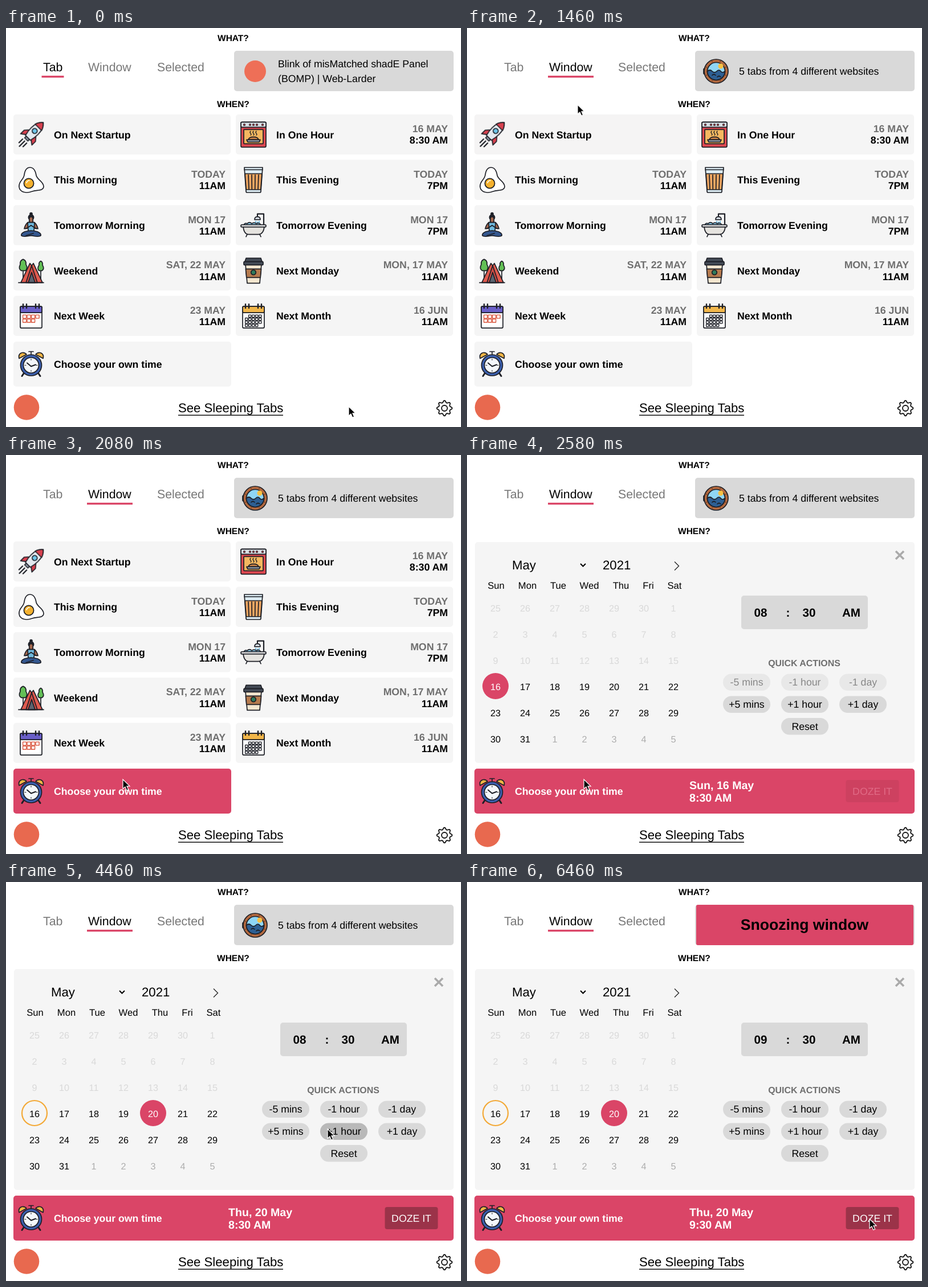
These frames come from a looping animation (798 by 701 pixels, 6.54 s). An HTML page:

```html
<!DOCTYPE html>
<html lang="en">
<head>
<meta charset="utf-8">
<title>Sleeping tabs</title>
<style>
  html, body { margin: 0; width: 100%; height: 100%; overflow: hidden; background: #fff; }
  svg { display: block; width: 798px; height: 701px; font-family: "Liberation Sans", Arial, sans-serif; }
  text { text-rendering: geometricPrecision; }
  .b { font-weight: bold; }
  .m { text-anchor: middle; }
  .e { text-anchor: end; }
  .icon { stroke: #1d1f26; stroke-width: 1.7; stroke-linejoin: round; stroke-linecap: round; }
  #pink { transform-box: fill-box; transform-origin: center; }
</style>
</head>
<body>
<svg id="stage" viewBox="0 0 798 701"></svg>
<script>
const LOOP = 6540;
const PINK = '#da4567';
const stage = document.getElementById('stage');

// Shape helpers
const text = (x, y, str, size = 17.7, cls = '', extra = '') =>
  `<text x="${x}" y="${y}" font-size="${size}" class="${cls}" ${extra}>${str}</text>`;
const box = (x, y, w, h, r, fill, extra = '') =>
  `<rect x="${x}" y="${y}" width="${w}" height="${h}" rx="${r}" fill="${fill}" ${extra}/>`;
const dot = (x, y, r, fill, extra = '') =>
  `<circle cx="${x}" cy="${y}" r="${r}" fill="${fill}" ${extra}/>`;
const path = (d, fill = 'none', extra = '') => `<path d="${d}" fill="${fill}" ${extra}/>`;
const group = (id, body, extra = '') => `<g id="${id}" ${extra}>${body}</g>`;
const range = n => [...Array(n).keys()];

// Icons, each centred on 0,0
const calendar = (top, cells) =>
  box(-19, -17, 38, 38, 2, '#fff') + box(-19, -17, 38, 11, 2, top) +
  [-14, -8, 8, 14].map(x => path(`M${x} -21V-14`, 'none', 'stroke-width="2.4"')).join('') + cells;
const cells = (cols, rows, w, color, keep) => range(cols * rows).filter(keep).map(i =>
  box(-15 + (i % cols) * (30 / cols) + .6, -2 + Math.floor(i / cols) * (w + 1.2), w, w, .5, '#fff',
    `stroke="${color}" stroke-width="1.4"`)).join('');

const icons = {
  rocket: `<g transform="rotate(45)">` +
    path('M-7 -5L-14 3V12L-6 6ZM7 -5L14 3V12L6 6Z', '#d8414f') +
    path('M0 -30C10 -21 10 -7 6 8H-6C-10 -7 -10 -21 0 -30Z', '#e4e9ef') +
    path('M0 -30Q6 -25 8 -18H-8Q-6 -25 0 -30Z', '#d8414f') +
    dot(0, -9, 4.4, '#6fc5e8') + path('M-4 8H4V12H-4Z', '#8d97a5') +
    path('M0 16V29M-5 16V25M5 16V25', 'none', 'stroke-width="2.2"') + '</g>',
  oven: box(-22, -22, 44, 44, 2, '#de4850') + box(-22, -22, 44, 9, 2, '#d9dee3') +
    [-16, -6, 0, 6, 16].map(x => dot(x, -17.3, 1.5, '#de4850', 'stroke-width="1.2"')).join('') +
    box(-17, -9, 34, 25, 1, '#f5b860') +
    path('M-5 -6q-2 2 0 4t0 3M0 -6q-2 2 0 4t0 3M5 -6q-2 2 0 4t0 3', 'none', 'stroke-width="1.3"') +
    path('M-9 9Q-8 4 0 4T9 9Z', '#c98145') + path('M-12 9H12L10 13H-10Z', '#9aa4ae'),
  egg: path('M-2 -22C6 -22 8 -14 9 -8C11 0 21 2 22 11C22 20 10 17 2 20C-8 24 -20 22 -21 12C-22 2 -13 0 -12 -9C-11 -16 -9 -22 -2 -22Z', '#fff') +
    dot(-4, 6, 8.6, '#f5b12e') + path('M-8 5Q-7 1 -3 1', 'none', 'stroke="#fff"'),
  glass: path('M-16 -22H16L13 20Q13 22 11 22H-11Q-13 22 -13 20Z', '#dcebf2') +
    path('M-14.8 -11H14.8L12.8 17H-12.8Z', '#efa662') +
    path('M-9 -9L-8 16M-3 -9L-2.7 16M3 -9L2.7 16M9 -9L8 16M-16 -18H16'),
  yoga: dot(0, -20, 2, '#23252d') + dot(0, -14, 4.6, '#23252d') + box(-3.2, -15, 6.4, 11, 3.2, '#a5694f') +
    path('M-6 -5Q-11 0 -12 6L0 4L12 6Q11 0 6 -5Z', '#a5694f') + path('M-6 -5H6L5 11H-5Z', '#70b9dd') +
    path('M-9 6L0 0L9 6', 'none') +
    path('M-11 11Q0 8 11 11Q18 14 17 18Q14 21 0 18Q-14 21 -17 18Q-18 14 -11 11Z', '#34578f') +
    path('M-9 18L4 14'),
  bath: path('M18 0V-20H7V-16', 'none', 'stroke-width="2.2"') + path('M2 -10Q2 -15 7 -15T12 -10Z', '#dde5ec') +
    path('M4 -7V-5M7 -6V-4M10 -7V-5', 'none', 'stroke="#5bb4e2"') +
    path('M-17 0Q-16 -5 -11 -3Q-7 -7 -3 -3Q1 -6 5 -3Q11 -6 13 0Z', '#8fd0ef') +
    path('M-18 2H19Q18 15 9 16H-9Q-17 15 -18 2Z', '#e5e3df') + box(-22, -1, 44, 4, 2, '#f4f4f4') +
    path('M-11 16L-13 20M11 16L13 20'),
  tent: path('M-14 20V-8M17 16V-6') + path('M-14 -20Q-8 -18 -9 -11Q-5 -4 -10 0H-17Q-23 -3 -19 -11Q-20 -18 -14 -20Z', '#62bf55') +
    path('M17 -17Q21 -15 20 -10Q24 -3 19 0H14Q10 -4 14 -10Q13 -15 17 -17Z', '#62bf55') +
    path('M-2 -13L-18 21H20L4 -13L1 -9Z', '#e05a4e') + path('M1 -9L-9 21H11Z', '#d14d45') +
    path('M1 3L-5 21H7Z', '#5b6470') + path('M-22 21H22'),
  coffee: path('M-14 -11H14L11 22H-11Z', '#f4e6cf') + path('M-13.6 -3H13.6L12.2 12H-12.2Z', '#b67b4e') +
    dot(0, 3, 4.3, '#2f7d5b') + box(-17, -16, 34, 6, 1.5, '#454c57') + path('M-13 -22H13L15 -16H-15Z', '#454c57'),
  week: calendar('#6a5fc8', cells(4, 2, 6, '#d9573f', i => i < 7)),
  month: calendar('#f1b64a', cells(5, 4, 4.2, '#23252d', i => i && i < 19)),
  clock: path('M-12 15L-16 21M12 15L16 21', 'none', 'stroke-width="3"') +
    path('M-21 -10Q-23 -18 -16 -20Q-11 -21 -8 -17ZM21 -10Q23 -18 16 -20Q11 -21 8 -17Z', '#f2b544') +
    path('M0 -17V-21M-4 -22H4') + dot(0, 2, 18.5, '#3b5fae') + dot(0, 2, 13.5, '#f3f7fb') +
    path('M-7 -2L0 4L8 1', 'none', 'stroke-width="2"') +
    path('M0 -9V-7M0 11V13M-11 2H-9M9 2H11', 'none', 'stroke-width="1"'),
  porthole: box(-22, -5, 6, 10, 2, '#b87746') + dot(0, 0, 21, '#b3693f') + dot(0, 0, 15.5, '#8fd6f5') +
    dot(8, -9, 4.5, '#f7c144', 'stroke="none"') +
    path('M-15.5 0Q-11 -4 -7 0T1 0T8 0T15.5 0A15.5 15.5 0 0 1 -15.5 0Z', '#2d5f93') +
    path('M-7 7q3 -3 6 0M2 10q3 -3 6 0') +
    range(8).map(i => dot(18.3 * Math.cos(i * .785 + .39), 18.3 * Math.sin(i * .785 + .39), 1, '#6d3d25', 'stroke="none"')).join('')
};
const icon = (name, x, y) => `<g class="icon" fill="none" transform="translate(${x} ${y})">${icons[name]}</g>`;

// Snooze cards
const cards = [
  ['rocket', 'On Next Startup', '', ''], ['oven', 'In One Hour', '16 MAY', '8:30 AM'],
  ['egg', 'This Morning', 'TODAY', '11AM'], ['glass', 'This Evening', 'TODAY', '7PM'],
  ['yoga', 'Tomorrow Morning', 'MON 17', '11AM'], ['bath', 'Tomorrow Evening', 'MON 17', '7PM'],
  ['tent', 'Weekend', 'SAT, 22 MAY', '11AM'], ['coffee', 'Next Monday', 'MON, 17 MAY', '11AM'],
  ['week', 'Next Week', '23 MAY', '11AM'], ['month', 'Next Month', '16 JUN', '11AM']
];
const mix = k => `rgb(${[[246, 218], [165, 69], [87, 103]].map(([a, b]) => Math.round(a + (b - a) * k))})`;
function card([name, label, day, hour], i) {
  const row = i >> 1, x = i % 2 ? 403 : 13, y = 151.8 + row * 79.7;
  const face = (bg, ink, soft) => box(x, y, 381, 70.4, 5, bg) +
    text(x + 71, y + 41.8, label, 17.7, 'b', `fill="${ink}"`) +
    text(x + 372, y + 31.4, day, 17.7, 'b e', `fill="${soft}"`) +
    text(x + 372, y + 51.6, hour, 17.7, 'b e', `fill="${ink}"`);
  return face('#f5f5f5', '#000', '#6f6f6f') +
    (i % 2 ? '' : group('hot' + row, face(mix(row / 6), '#fff', '#fff'), 'opacity="0"')) +
    icon(name, x + 31, y + 35.5);
}

// Date and time picker
const names = { Sun: 51, Mon: 106, Tue: 160, Wed: 214.5, Thu: 270, Fri: 318, Sat: 364 };
function day(i) {
  const n = i < 6 ? 25 + i : (i - 6) % 31 + 1;
  const ink = i < 21 ? '#d9d9d9' : i > 36 ? '#adadad' : '#000';
  return text(50 + i % 7 * 52, 274.7 + Math.floor(i / 7) * 46, n, 16.2, 'm', `fill="${ink}"`);
}
const picked = (id, x, n) => group(id, dot(x, 406, 23, PINK) + text(x, 412.7, n, 16.2, 'm', 'fill="#fff"'));
const pill = (x, y, label, id = '') =>
  box(x, y, 83, 29.5, 14.7, '#d9d9d9', id && `id="${id}"`) + text(x + 41.5, y + 20.8, label, 17.7, 'm');
const picker =
  box(14, 153, 771, 388, 5, '#f5f5f5') +
  text(79, 201, 'May', 22.2) + text(238, 201, 2021, 22.2) +
  path('M199 191L203.5 195.5L208 191', 'none', 'stroke="#000" stroke-width="2"') +
  path('M364 187.5L371.5 195L364 202.5', 'none', 'stroke="#222" stroke-width="1.3"') +
  path('M752 169L766 183M766 169L752 183', 'none', 'stroke="#aaa" stroke-width="3.6"') +
  Object.entries(names).map(([n, x]) => text(x, 234.5, n, 16.6, 'm')).join('') +
  dot(258, 406, 23, '#e6e6e6', 'id="dayHover"') +
  range(42).map(day).join('') +
  dot(50, 406, 22, 'none', 'id="today" stroke="#f3a937" stroke-width="2.2"') +
  picked('pick16', 50, 16) + picked('pick20', 258, 20) +
  box(481, 247, 222, 59, 5, '#d9d9d9') +
  text(503.5, 284, '08', 20.6, 'b', 'id="h8"') + text(503.5, 284, '09', 20.6, 'b', 'id="h9"') +
  text(559.5, 284, ':', 20.6, 'b') + text(588.5, 284, 30, 20.6, 'b') + text(658, 284, 'AM', 20.6, 'b') +
  text(591.5, 371, 'QUICK ACTIONS', 15.9, 'b m', 'fill="#6f6f6f"') +
  group('minus', pill(449, 384.5, '-5 mins') + pill(551, 384.5, '-1 hour') + pill(653, 384.5, '-1 day')) +
  pill(449, 423.5, '+5 mins') + pill(551, 423.5, '+1 hour', 'plusHour') + pill(653, 423.5, '+1 day') +
  pill(551, 462, 'Reset');

const when = (id, date, hour) => group(id,
  text(390, 586.5, date, 19.6, 'b') + text(390, 608.7, hour, 19.6, 'b'), 'fill="#fff"');
const chooser =
  box(13, 551, 382, 79, 5, '#f5f5f5') + text(84, 597, 'Choose your own time', 17.7, 'b') +
  group('hot5', box(13, 551, 382, 79, 5, PINK, 'id="bar"') +
    text(84, 597, 'Choose your own time', 17.7, 'b', 'fill="#fff"')) +
  icon('clock', 44, 590.5) +
  group('extra', when('when0', 'Sun, 16 May', '8:30 AM') + when('when1', 'Thu, 20 May', '8:30 AM') +
    when('when2', 'Thu, 20 May', '9:30 AM') +
    group('go', box(664.5, 571, 93, 39, 4, '#9b3349', 'id="goBox"') +
      text(711, 597, 'DOZE IT', 17.7, 'm', 'fill="#fff"')));

const gear = 'M' + range(32).map(i => {
  const r = i % 4 < 2 ? 13.3 : 10.2, a = (i + (i % 2 ? -.12 : .12)) * Math.PI / 16 - .1;
  return `${(769 + r * Math.cos(a)).toFixed(2)} ${(668 + r * Math.sin(a)).toFixed(2)}`;
}).join('L') + 'Z';

const tab = (id, x, label) => text(x, 75.7, label, 21.3, '', `id="${id}" fill="#777"`);
stage.innerHTML =
  text(371, 23.1, 'WHAT?', 15.5, 'b') + text(370, 139.1, 'WHEN?', 15.5, 'b') +
  tab('tab', 65, 'Tab') + tab('window', 144, 'Window') + tab('selected', 265, 'Selected') +
  box(62.5, 83.8, 39, 3.4, 0, PINK, 'id="lineTab"') + box(142, 83.8, 80, 3.4, 0, PINK, 'id="lineWindow"') +
  box(400, 40, 385, 71, 5, '#d9d9d9') +
  group('page', dot(437, 76, 19, '#ee6f57') +
    text(477, 69, 'Blink of misMatched shadE Panel') + text(477, 95, '(BOMP) | Web-Larder')) +
  group('tabs', icon('porthole', 437, 76) + text(477, 82, '5 tabs from 4 different websites')) +
  box(402, 40, 381, 71, 3, PINK, 'id="pink"') +
  text(592, 84, 'Snoozing window', 26.6, 'b m', 'id="done"') +
  group('cards', cards.map(card).join('')) + group('picker', picker) + chooser +
  dot(36, 666.5, 22.3, '#e8694f') +
  text(302, 675, 'See Sleeping Tabs', 22.16) + box(302, 679.6, 184, 1.4, 0, '#000') +
  path(gear, 'none', 'stroke="#111" stroke-width="1.8" stroke-linejoin="round"') +
  dot(769, 668, 5, 'none', 'stroke="#111" stroke-width="1.8"') +
  group('cursor', group('ring', dot(0, 2, 26, 'none', 'stroke="#fff" stroke-width="4" stroke-opacity=".7"') +
    dot(0, 2, 26, 'none', 'stroke="#000" stroke-width="1.8"')) +
    path('M0 0V16.5L3.9 13L6.7 19.3L9.6 18L6.9 11.8H12Z', '#000', 'stroke="#fff" stroke-width="1.2"'));

// Timeline: steps are [ms, value, easing to the next step]
function track(id, prop, steps) {
  const all = steps.filter(([ms]) => ms <= LOOP);
  const last = all[all.length - 1];
  if (all[0][0] > 0) all.unshift([0, all[0][1]]);
  if (last[0] < LOOP) all.push([LOOP, last[1]]);
  document.getElementById(id).animate(
    all.map(([ms, value, easing = 'linear']) => ({ offset: ms / LOOP, [prop]: value, easing })),
    { duration: LOOP, iterations: Infinity });
}
// Visible from one time to another, with hard changes
function show(id, from, to = LOOP) {
  const steps = [[from, 1, 'step-end'], [to, 0, 'step-end']];
  if (from > 0) steps.unshift([0, 0, 'step-end']);
  track(id, 'opacity', steps);
}
// Fades in and out again for each [from, to] span
function glow(id, spans, fade = 100) {
  track(id, 'opacity', spans.flatMap(([from, to]) => {
    const rise = Math.min(fade, to - from), peak = rise / fade;
    return [[from, 0], [from + rise, peak], [to, peak], [to + fade, 0]];
  }));
}
const swap = (id, prop, ms, a, b, fade = 100) => track(id, prop, [[ms, a], [ms + fade, b]]);

const CLICK = { window: 960, choose: 2220, day: 3090, hour: 4750, go: 5780 };

track('cursor', 'transform', [
  [20, 601, 665], [200, 448, 589], [320, 328, 466], [430, 243, 296, 'ease-out'], [640, 192, 78],
  [1380, 192, 78, 'ease-in'], [1610, 203, 408, 'ease-out'], [1760, 204, 421, 'ease-in'],
  [1880, 205, 490, 'ease-out'], [2030, 205, 570], [2680, 205, 570, 'ease-in-out'],
  [3000, 258, 407], [3780, 258, 407, 'ease-in-out'], [4360, 564, 434],
  [5260, 564, 434, 'ease-in-out'], [5700, 706, 592]
].map(([ms, x, y, ease]) => [ms, `translate(${x}px, ${y}px)`, ease]));
glow('ring', Object.values(CLICK).map(t => [t - 10, t + 140]), 30);

glow('hot4', [[247, 315], [1860, 1925]]);
glow('hot3', [[315, 369], [1590, 1860]]);
glow('hot2', [[369, 420], [1540, 1590]]);
glow('hot1', [[420, 450], [1500, 1540]]);
glow('hot0', [[450, 500], [1460, 1500]]);
swap('hot5', 'opacity', 1930, 0, 1);

const opened = CLICK.window + 60;
track('window', 'fill', [[620, '#777'], [700, '#333'], [opened, '#333'], [opened + 100, '#000']]);
swap('tab', 'fill', opened, '#000', '#777');
swap('lineTab', 'opacity', opened, 1, 0);
swap('lineWindow', 'opacity', opened, 0, 1);
show('page', 0, opened);
show('tabs', opened, 5910);

const unfold = CLICK.choose + 80;
swap('cards', 'opacity', unfold, 1, 0, 150);
swap('picker', 'opacity', unfold, 0, 1, 150);
swap('extra', 'opacity', unfold + 50, 0, 1, 150);
track('bar', 'width', [[unfold, '382px', 'ease'], [unfold + 200, '772px']]);

const chosen = CLICK.day + 50;
show('dayHover', 2960, chosen);
show('pick16', 0, chosen);
show('pick20', chosen);
show('today', chosen);
show('when0', 0, chosen);
swap('minus', 'opacity', chosen, .45, 1);
swap('go', 'opacity', chosen, .2, 1);

const later = CLICK.hour + 50;
show('when1', chosen, later);
show('when2', later);
show('h8', 0, later);
show('h9', later);
track('plusHour', 'fill', [[4240, '#d9d9d9'], [4320, '#b9b9b9'], [5320, '#b9b9b9'], [5400, '#d9d9d9']]);

track('goBox', 'fill', [[5620, '#9b3349'], [5720, '#7d2a3f'], [5940, '#7d2a3f'], [6040, '#9b3349']]);
track('pink', 'transform', [[5910, 'scaleX(0)', 'ease-out'], [6460, 'scaleX(1)']]);
swap('done', 'opacity', 5930, 0, 1, 200);
</script>
</body>
</html>
```
